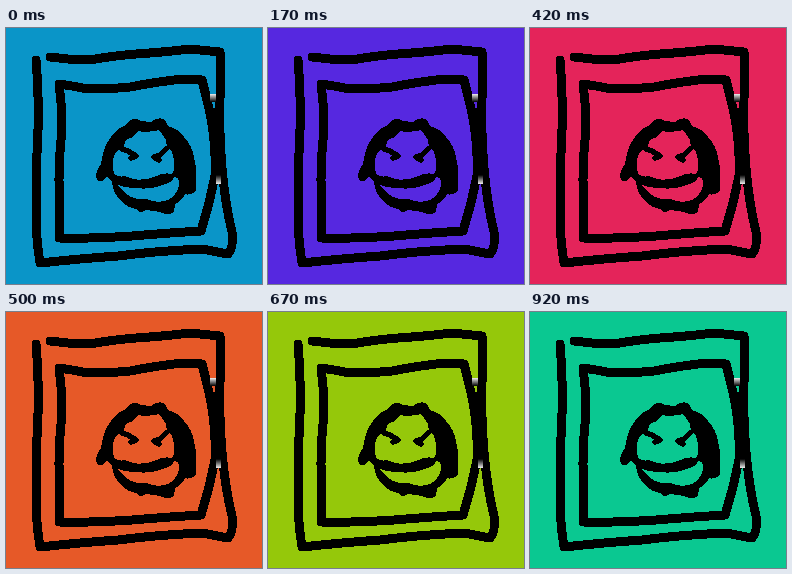
An HTML page that plays this animation: 256x256 px, repeating every 1010 ms.

```html
<!DOCTYPE html>
<html lang="en">
<head>
<meta charset="utf-8">
<title>Colour cycling doodle</title>
<style>
  html, body { margin: 0; width: 100%; height: 100%; overflow: hidden; }
  svg {
    display: block;
    width: 100vw;
    height: 100vh;
    color: #0a95c8;
    background: currentColor;
    shape-rendering: crispEdges;
    animation: hues 1010ms step-end infinite;
  }
  .line { fill: none; stroke: #000; stroke-width: 9; stroke-linecap: round; stroke-linejoin: round; }
  .paper { fill: currentColor; }
  .thin { stroke-width: 5.5; }

  @keyframes hues {
    0%      { color: #0a95c8; }
    7.921%  { color: #2859e2; }
    16.832% { color: #5628e0; }
    24.752% { color: #930ac6; }
    32.673% { color: #c50a93; }
    41.584% { color: #e4245a; }
    49.505% { color: #e65928; }
    57.426% { color: #c6910b; }
    66.337% { color: #95c80a; }
    74.257% { color: #59e628; }
    82.178% { color: #28e658; }
    91.089% { color: #0ac891; }
  }
</style>
</head>
<body>
<svg viewBox="0 0 256 256" preserveAspectRatio="none">
  <defs>
    <linearGradient id="fade" x2="0" y2="1">
      <stop offset="0" stop-color="#000"/>
      <stop offset="1" stop-color="#eee"/>
    </linearGradient>
    <linearGradient id="rise" href="#fade" y1="1" x2="0" y2="0"/>
  </defs>

  <g class="line">
    <!-- outer sheet -->
    <path d="M44 29 Q64 32 84 32 Q105 28 130 26 Q160 24 184 21 L214 24 L214 70 Q213 105 216 140 Q219 175 226 204 Q228 220 222 226 L196 221 Q150 223 112 228 Q70 231 34 235 Q30 210 30 185 L31 125 Q34 75 30 32"/>
    <!-- inner sheet -->
    <path d="M53 56 Q68 58 82 61 Q105 61 124 59 Q155 53 178 51 L196 52 L202 76 Q208 100 209 128 L209 148 L203 175 L195 203 Q160 205 126 208 Q88 211 53 210 L54 184 Q52 150 54 124 Q58 90 53 56"/>
  </g>
  <!-- smudges where the sheets meet -->
  <path d="M207 80 L210 80 L214 120 L212 148 L209 148 Z"/>
  <rect x="204" y="66" width="6" height="8" fill="url(#rise)"/>
  <rect x="210" y="147" width="5" height="9" fill="url(#fade)"/>

  <!-- head -->
  <path d="M123 93 Q129 89 135 93 L145 94 Q153 88 159 92 L162 98 Q173 101 178 109 Q187 119 188 130 Q191 141 190 152 L190 163 Q184 168 179 166 Q176 173 169 176 L168 184 Q162 188 154 184 L140 182 Q133 187 131 181 Q121 180 117 174 Q107 167 106 154 L101 148 L97 153 Q91 155 90 148 Q91 140 95 136 Q97 120 103 112 Q110 101 118 98Z"/>
  <g class="paper">
    <path d="M117 120 L120 112 L127 109 L132 103 Q142 105 153 102 Q157 107 160 112 L161 119 L166 124 Q171 139 166 146 Q157 144 148 149 Q137 153 127 151 L119 148 Q112 150 108 145 Q105 137 108 128 Q110 122 117 120Z"/>
    <path d="M112 157 Q120 160 129 160 Q145 162 156 157 Q166 155 168 149 Q174 149 173 158 Q170 168 162 172 Q151 176 141 171 Q128 172 122 167 Q115 162 112 157Z"/>
  </g>

  <!-- eyes -->
  <g class="line thin">
    <path d="M116 121 L122 123 L130 128 L125 130"/>
    <path d="M160 121 L154 127 L148 129 L153 132"/>
  </g>
</svg>
</body>
</html>
```
